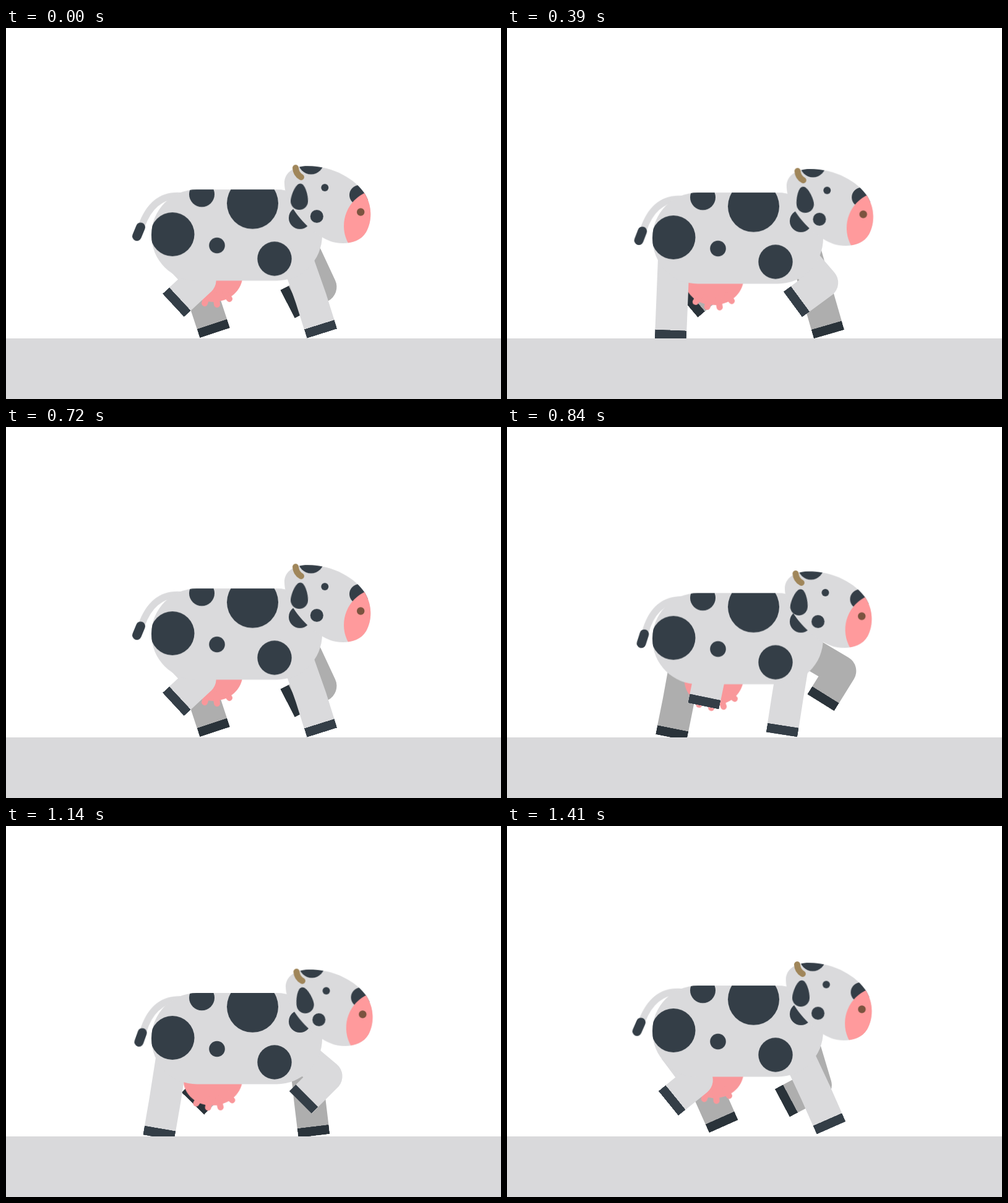
An HTML page without scripts for the animation above (1.44 s loop, 800 by 600 pixels).

```html
<!DOCTYPE html>
<html lang="en">
<head>
<meta charset="utf-8">
<title>Walking cow</title>
<style>
  html, body { margin: 0; width: 100%; height: 100%; overflow: hidden; background: #fff; }
  svg { display: block; width: 100%; height: 100%; }

  .coat { fill: #dadadc; }
  .dark { fill: #343e47; }

  .bob, .nod, .ear, .swing, .leg, .drift { animation: 720ms linear infinite; }

  /* Trunk, tail, udder and head complete one cycle per step */
  .bob { animation-name: bob; animation-duration: 360ms; }
  .swing { animation-name: swing; animation-duration: 360ms; }
  .nod { animation-name: nod, sway; animation-duration: 360ms, 720ms; transform-origin: 515px 258px; }
  .ear { animation-name: flap; transform-origin: 476px 252px; }
  .tail { --reach: .42; transform-origin: 285px 272px; }
  .udder { --reach: 1; transform-origin: 334.5px 400px; }

  /* Legs: hip, knee and sole joined by one thick line */
  .leg { fill: none; stroke: #dadadc; stroke-width: 51; stroke-linejoin: round; marker-end: url(#hoof); }
  .far .leg { stroke: #aeaeae; marker-end: url(#far-hoof); }
  .front { animation-name: front; }
  .back { animation-name: back; }
  .far .front { animation-delay: -352ms; }
  .far .back { animation-delay: -310ms; }
  .drift { animation-name: drift; }

  @keyframes bob {
    0%, 100% { transform: translateY(0); }
    8.3% { transform: translateY(5px); }
    16.7% { transform: translateY(9px); }
    26.4% { transform: translateY(10px); }
    41.7% { transform: translateY(4.7px); }
    58.3% { transform: translateY(-1.5px); }
    75% { transform: translateY(-5px); }
    91.7% { transform: translateY(-3px); }
  }
  @keyframes swing {
    0%, 100% { transform: rotate(0deg); }
    8.3% { transform: rotate(calc(var(--reach) * -3.2deg)); }
    16.7% { transform: rotate(calc(var(--reach) * -7deg)); }
    29% { transform: rotate(calc(var(--reach) * -11deg)); }
    41.7% { transform: rotate(calc(var(--reach) * -12deg)); }
    58.3% { transform: rotate(calc(var(--reach) * -5.5deg)); }
    75% { transform: rotate(calc(var(--reach) * .8deg)); }
    91.7% { transform: rotate(calc(var(--reach) * 3deg)); }
  }
  @keyframes nod {
    0%, 100% { transform: translateY(0) rotate(0deg); }
    8.3% { transform: translateY(4.5px) rotate(-.8deg); }
    16.7% { transform: translateY(8.5px) rotate(-1.4deg); }
    29% { transform: translateY(10.7px) rotate(-1.6deg); }
    41.7% { transform: translateY(8.5px) rotate(-1deg); }
    58.3% { transform: translateY(4px) rotate(.4deg); }
    75% { transform: translateY(.4px) rotate(1.4deg); }
    91.7% { transform: translateY(-1.6px) rotate(.5deg); }
  }
  @keyframes sway {
    0%, 100% { translate: 0; }
    20.8% { translate: -1px; }
    37.5% { translate: .5px; }
    54.2% { translate: 2px; }
    65% { translate: 2.7px; }
    95.8% { translate: .7px; }
  }
  @keyframes flap {
    0%, 100% { transform: rotate(4deg); }
    20.8% { transform: rotate(9deg); }
    37.5% { transform: rotate(1deg); }
    54.2% { transform: rotate(-7.5deg); }
    58.3% { transform: rotate(-10deg); }
    72% { transform: rotate(-9deg); }
    95.8% { transform: rotate(3deg); }
  }
  @keyframes drift {
    0%, 30%, 95%, 100% { transform: translateX(22px); }
    54%, 60% { transform: translateX(28px); }
  }
  @keyframes front {
    0%, 100% { d: path("M466 361L493 437L511 494"); }
    3.1% { d: path("M466 361L488 437L505 495"); }
    7.2% { d: path("M466 361L475 441L482.5 501"); }
    20.8% { d: path("M466 361L444 438L428 496"); }
    29.2% { d: path("M466 361L451 431L408 474"); }
    37.5% { d: path("M466 361L467.5 420L414.5 449.5"); }
    44.7% { d: path("M466 361L483 419L428.5 448"); }
    48.9% { d: path("M466 361L492.5 419L438.5 446.5"); }
    54.2% { d: path("M466 361L509.5 412L461.5 447"); }
    58.3% { d: path("M466 361L518 405L475.5 447"); }
    69.7% { d: path("M466 361L525.5 389L499.5 445"); }
    78% { d: path("M466 361L528 388L526 449"); }
    86.4% { d: path("M466 361L523 396L549 451"); }
    95.8% { d: path("M466 361L500 433L524.5 488"); }
  }
  @keyframes back {
    0%, 100% { d: path("M270 361L314 408L270 448.5"); }
    10.4% { d: path("M270 361L325 399L298 451"); }
    20.8% { d: path("M270 361L332 391L329.5 451.5"); }
    29.2% { d: path("M270 361L326 410L341 467"); }
    37.5% { d: path("M270 361L309.5 429L337 482"); }
    38.9% { d: path("M270 361L304 431L328.5 485.5"); }
    43.1% { d: path("M270 361L297 436L316 493"); }
    54.2% { d: path("M270 361L267 443L264.7 503.5"); }
    58.3% { d: path("M270 361L257 445L247 504"); }
    63.9% { d: path("M270 361L250 439L233.5 497"); }
    72% { d: path("M270 361L258 432L217 474"); }
    80.6% { d: path("M270 361L276 423L222 449.5"); }
    95.8% { d: path("M270 361L307 411L260.5 448.5"); }
  }
</style>
</head>
<body>
<svg viewBox="0 0 800 600">
  <defs>
    <marker id="hoof" markerUnits="userSpaceOnUse" markerWidth="15" markerHeight="51" refX="15" refY="25.5" orient="auto">
      <rect width="15" height="51" fill="#343e47"/>
    </marker>
    <marker id="far-hoof" markerUnits="userSpaceOnUse" markerWidth="15" markerHeight="51" refX="15" refY="25.5" orient="auto">
      <rect width="15" height="51" fill="#2a333a"/>
    </marker>
    <rect id="trunk" x="235" y="261" width="276" height="147.5" rx="73.5"/>
    <path id="skull" d="M450 252C449 232 468 223 487 223C530 223 565 245 580 268C592 288 592 312 582 330C572 347 550 350 533 347C500 341 451 292 450 252Z"/>
    <clipPath id="in-trunk"><use href="#trunk"/></clipPath>
    <clipPath id="in-skull"><use href="#skull"/></clipPath>
  </defs>

  <g class="far">
    <g class="drift"><path class="leg back"/></g>
    <g transform="translate(16)"><path class="leg front"/></g>
  </g>

  <g class="bob">
    <g class="swing udder" fill="#f9979a">
      <ellipse cx="334.5" cy="400" rx="48" ry="43"/>
      <path d="M311 426L302.7 436M325 432L321 445M339 432L341 447M354 428L361 438" stroke="#f9979a" stroke-width="10" stroke-linecap="round"/>
    </g>
    <g class="swing tail" fill="none" stroke-linecap="round">
      <path d="M288 272C246 266 228 295 219 320" stroke="#dadadc" stroke-width="11"/>
      <path d="M217.5 322L211.5 336.5" stroke="#343e47" stroke-width="15"/>
    </g>
  </g>

  <path class="leg back"/>
  <path class="leg front"/>

  <g class="bob">
    <use href="#trunk" class="coat"/>
    <g class="dark" clip-path="url(#in-trunk)">
      <circle cx="269" cy="333.5" r="35.5"/>
      <circle cx="316.5" cy="268.7" r="20.5"/>
      <circle cx="398.5" cy="283.3" r="41.5"/>
      <circle cx="341" cy="351.5" r="12.8"/>
      <circle cx="434" cy="373" r="27.7"/>
      <circle cx="475" cy="307" r="18"/>
    </g>
  </g>

  <g class="nod">
    <use href="#skull" class="coat"/>
    <g class="dark" clip-path="url(#in-skull)">
      <circle cx="493" cy="215.5" r="21"/>
      <circle cx="571" cy="270" r="16"/>
      <circle cx="605" cy="320" r="59" fill="#ff9a9c"/>
    </g>
    <circle class="dark" cx="515.3" cy="258" r="6"/>
    <circle class="dark" cx="502.3" cy="304.5" r="10.5"/>
    <circle cx="573.2" cy="297.5" r="6.2" fill="#7b533f"/>
    <path d="M468 226Q468.500 236 477 241" fill="none" stroke="#a0865a" stroke-width="10" stroke-linecap="round"/>
    <path class="dark ear" d="M476 251.500C484 251.500 490 271 490 280A14 14 0 0 1 462 280C462 271 468 251.500 476 251.500Z"/>
  </g>

  <rect y="502" width="800" height="98" fill="#d9d9db"/>
</svg>
</body>
</html>
```
